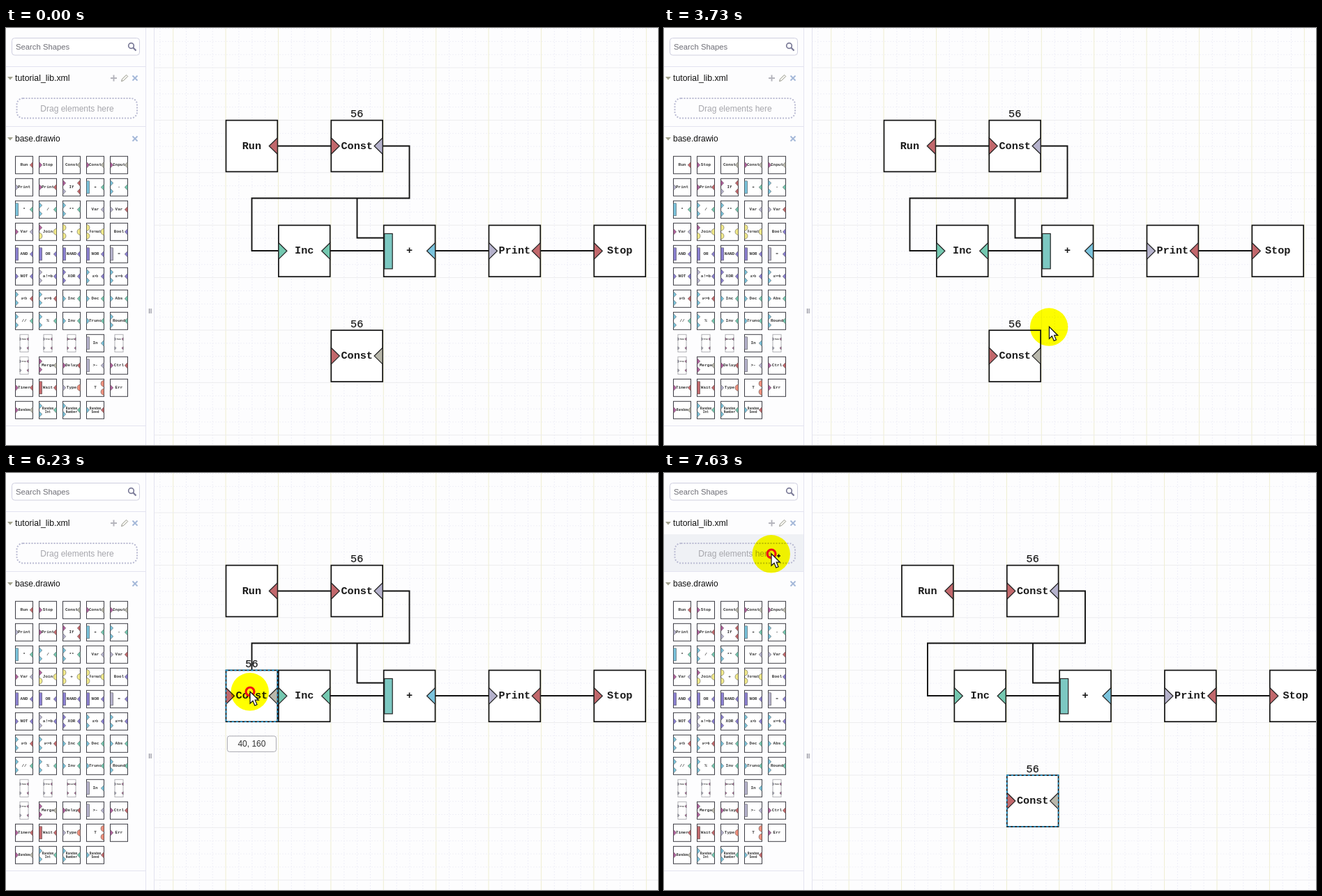
Animation, 935 px wide and 599 px high, one loop 8000 ms. Source, as an HTML page:

```html
<!DOCTYPE html>
<html lang="en">
<head>
<meta charset="utf-8">
<title>Diagram editor</title>
<style>
html, body { margin: 0; width: 100%; height: 100%; overflow: hidden; background: #fdfdfe; }
svg { display: block; }
text { font-family: "Liberation Sans", Arial, sans-serif; font-size: 12px; }
.mono { font: bold 15.2px "Liberation Mono", "Courier New", monospace; text-anchor: middle; fill: #1a1a1a; }
.caption { font-weight: normal; stroke: #1a1a1a; stroke-width: .25; }
.mid { text-anchor: middle; }
.box { fill: #fff; stroke: #111; stroke-width: 1.7; }
.port { stroke: #222; stroke-width: 1.2; }
.wire { fill: none; stroke: #111; stroke-width: 1.9; }
.icon .box { stroke: #3c3c44; stroke-width: 1; }
.icon .port { stroke: #444; stroke-width: .5; }
.icon .mono { fill: #333; }
.spot { fill: #ff0; mix-blend-mode: multiply; }
</style>
</head>
<body>
<svg id="stage" width="935" height="599" viewBox="0 0 935 599"></svg>
<script>
const LOOP = 8000, FPS = 30;
const UNIT = 1.885, STEP = UNIT * 10, SIZE = 73.8;
const ORIGIN = { x: 240.1, y: -18.2 };
const HOME = { x: 120, y: 240 };
const PRESS = { t: 4850, x: 500, y: 460 };
const SCROLL = 25.5;
const HUES = {
  r: '#c2686c', t: '#74c8b0', k: '#b9b8ac', l: '#b5b2cc', p: '#b0609c',
  b: '#7ac3dc', y: '#f1e98a', v: '#8a7fd0', o: '#ee8f7c', c: '#7cc8c2'
};

const px = u => ORIGIN.x + u * UNIT;
const py = u => ORIGIN.y + u * UNIT;
const path = (d, attrs) => `<path d="${d}" ${attrs}/>`;
const rect = (x, y, w, h, attrs) => `<rect x="${x}" y="${y}" width="${w}" height="${h}" ${attrs}/>`;
const text = (x, y, s, attrs) => `<text x="${x}" y="${y}" ${attrs}>${s}</text>`;

// Triangle with its base at x; dir 1 points right, -1 left
const port = (x, y, dir, w, h, hue) =>
  path(`M${x} ${y - h}L${x + dir * w} ${y}L${x} ${y + h}Z`, `class="port" fill="${HUES[hue]}"`);

function node(x, y, label, left, right, caption = '') {
  const m = SIZE / 2;
  let s = rect(0, 0, SIZE, SIZE, 'class="box"');
  if (left === 'c') s += rect(1, 12, 11.5, 50.5, `class="port" fill="${HUES.c}"`);
  else if (left) s += port(0, m, 1, 12, 11.8, left);
  if (right) s += port(SIZE, m, -1, 12, 11.8, right);
  s += text(m, 41, label, 'class="mono"') + text(m, -4.6, caption, 'class="mono caption"');
  return `<g transform="translate(${x} ${y})">${s}</g>`;
}

function grid() {
  let s = '';
  for (let i = -8; i < 40; i++) {
    const major = i % 4 === 0, x = px(i * 10) - .4, y = py(i * 10) - .2;
    s += path(`M${x} 0V599`, `stroke="${major ? '#efeed2' : '#efeff8'}" ${major ? '' : 'stroke-dasharray="2 2"'}`);
    if (i > 0) s += path(`M100 ${y}H935`, `stroke="${major ? '#ececee' : '#f0f0f7'}" ${major ? '' : 'stroke-dasharray="2 2"'}`);
  }
  return s;
}

function wires() {
  return path('M390 169.5H466M541 169.5H578.5V244.5H352.5V320H391M503.5 244.5V301.5H541' +
    'M465 320H541M616 320H692M767 320H843', 'class="wire"');
}

function hoverArrows() {
  const cx = px(HOME.x) + SIZE / 2, cy = py(HOME.y) + SIZE / 2;
  return [0, 90, 180, 270].map(a =>
    path('M0 -68L7 -59H3V-48H-3V-59H-7Z', `fill="#d6eef8" transform="translate(${cx} ${cy}) rotate(${a})"`)).join('');
}

// label,left ports,right ports; capitals are bars, "~" splits lines, "#" is a narrow tile
const TILES = `Run,,r Stop,p, Const,,k Const,p,k Input,p,k
Print,l, Print,p,r If,pl,rr +,B,t -,bb,t
*,B,t /,bb,t **,bb,t Var,,l Var,l,r
Var,p,l Join,py,y +,yy,y Format,yy,y Bool,,v
AND,V,v OR,V,v NAND,V,v NOR,V,v =,L,v
NOT,v,v a!=b,ll,v XOR,vv,v a&gt;b,bb,v a&gt;=b,bb,v
a&lt;b,bb,r a&lt;=b,bb,r Inc,b,t Dec,b,t Abs,b,t
//,bb,t %,bb,t Inv,b,t Trunc,b,t Round,bb,t
#Func,l,p #Proc,l,p #Return,p, In,L,b #Func,l,p
#Proc,l,p Merge,pp,k Delay,p,r >-,L,l Ctrl,p,r
Timer,p,r Wait,R,r Type,l,o T,,oo Err,p,
Random,p,k Random~Int,bb,t Random~Number,bb,t Random~Seed,b,r`;

function tilePorts(codes, x, dir) {
  return [...codes].map((ch, i) => {
    const y = codes.length > 1 ? (i ? 6 : -6) : 0, hue = ch.toLowerCase();
    if (ch !== hue) return rect(x, -9, 4.2, 18, `class="port" fill="${HUES[hue]}"`);
    if ('yo'.includes(ch))
      return path(`M${x} ${y - 4.5}A4.5 4.5 0 0 ${dir > 0 ? 1 : 0} ${x} ${y + 4.5}Z`, `class="port" fill="${HUES[ch]}"`);
    return port(x, y, dir, 4.2, 4.5, ch);
  }).join('');
}

function tile(spec, col, row) {
  const narrow = spec[0] === '#';
  const [label, left, right] = spec.replace('#', '').split(',');
  const half = narrow ? 6 : 12.5, lines = label.split('~');
  let s = rect(-half, -12.5, half * 2, 25, narrow ? 'class="box" style="stroke:#b0b0b4"' : 'class="box"');
  if (narrow) {
    s += text(0, -5, label, 'class="mono" style="font-size:2.6px"');
    for (const y of [-6, 7])
      s += port(-6, y, 1, 2, 2, left || 'l') + port(6, y, -1, 2, 2, right || 'p');
  } else {
    s += tilePorts(left, -half, 1) + tilePorts(right, half, -1);
    const size = lines.length > 1 || label.length > 5 ? 4.6 : 6;
    lines.forEach((line, i) => {
      const y = lines.length > 1 ? -.8 + i * 4.6 : 1.6;
      s += text(0, y, line, `class="mono" style="font-size:${size}px"`);
    });
  }
  return `<g class="icon" transform="translate(${26 + col * 34} ${196.8 + row * 32})">${s}</g>`;
}

function sidebar() {
  const cross = y => path(`M181.5 ${y - 3.5}l7 7m0 -7l-7 7`, 'stroke="#a3b7d8" stroke-width="1.8"');
  const fold = y => path(`M2 ${y - 2}h8l-4 4.5z`, 'fill="#a0a08c"');
  let s = rect(0, 0, 212, 599, 'fill="#fdfdfe"');
  s += path('M200.5 0V599M212.5 0V599M0 55.5H200M0 141.5H200M0 571.5H200', 'stroke="#e3e3f0"');
  s += path('M205.5 403V410M208 403V410', 'stroke="#8c8c98" stroke-width="1.2"');
  s += rect(8.5, 14.5, 183, 24.5, 'rx="4" fill="#fff" stroke="#cfcfe0"');
  s += text(14, 31, 'Search Shapes', 'fill="#707078" style="font-size:11.3px"');
  s += '<circle cx="179.5" cy="25.5" r="3.8" fill="none" stroke="#7b7b98" stroke-width="1.7"/>';
  s += path('M182.3 28.3L186.5 32.5', 'stroke="#7b7b98" stroke-width="2.2"');
  s += fold(72) + text(13, 76, 'tutorial_lib.xml', 'fill="#111" style="font-size:12.3px"');
  s += path('M150 72H159M154.5 67.5V76.5', 'stroke="#b5b5bd" stroke-width="2"');
  s += path('M165.5 76.5l1 -3.2l6 -6l2.2 2.2l-6 6z', 'fill="#f4f4ee" stroke="#99998f"') + cross(72);
  s += rect(0, 88, 200, 53, 'id="zone" fill="#eff1f5"');
  s += rect(15.5, 101, 172.5, 28.5, 'rx="9" fill="none" stroke="#b9bad2" stroke-width="2" stroke-dasharray="2 2"');
  s += text(102, 119.5, 'Drag elements here', 'class="mid" fill="#a6a6ac"');
  s += fold(159) + text(13, 163, 'base.drawio', 'fill="#111"') + cross(159);
  TILES.split('\n').forEach((line, row) =>
    line.split(' ').forEach((spec, col) => { s += tile(spec, col, row); }));
  return s;
}

function pointer() {
  const cross = 'M0 -10L4 -6H1.2V-1.2H6V-4L10 0L6 4V1.2H1.2V6H4L0 10L-4 6H-1.2V1.2H-6V4L-10 0L-6 -4V-1.2H-1.2V-6H-4Z';
  return '<circle class="spot" cx="-.3" cy=".3" r="27.2"/>' +
    '<circle id="ring" r="6" fill="none" stroke="#f01414" stroke-width="3.2"/>' +
    path('M0 0V17L4 13.2L6.8 20L10 18.7L7.2 12.2H12.3Z', 'id="arrow" fill="#fff" stroke="#111" stroke-width="1.2"') +
    path(cross, 'id="move" fill="#111" stroke="#fff" stroke-width="1.6" paint-order="stroke"') +
    path('M8 3H13M10.5 .5V5.5', 'id="plus" stroke="#111" stroke-width="1.5"');
}

const nodes = [
  [40, 80, 'Run', '', 'r'], [120, 80, 'Const', 'r', 'l', '56'],
  [80, 160, 'Inc', 't', 't'], [160, 160, '+', 'c', 'b'],
  [240, 160, 'Print', 'l', 'r'], [320, 160, 'Stop', 'r', '']
].map(([x, y, ...rest]) => node(px(x), py(y), ...rest)).join('');

// The spot blends with the drawing, so the pointer parts sit directly on the stage
const stage = document.getElementById('stage');
stage.innerHTML =
  `<g id="page">${grid()}${wires()}${nodes}<g id="hover">${hoverArrows()}</g>` +
  `<g id="drag">${node(0, 0, 'Const', 'r', 'k', '56')}` +
  rect(0, 0, SIZE, SIZE, 'id="outline" fill="none" stroke="#1e9bd8" stroke-width="1.6" stroke-dasharray="3 3"') +
  `<g id="tip">${rect(0, 94.5, 70, 22.5, 'id="tipBox" rx="3" fill="#fdfdfd" stroke="#a9a9b0"')}` +
  `${text(SIZE / 2, 110, '', 'id="tipText" class="mid" fill="#333"')}</g></g></g>` +
  `<g>${sidebar()}</g>${pointer()}`;

const $ = id => document.getElementById(id);
const parts = [stage.querySelector('.spot'), $('ring'), $('arrow'), $('move'), $('plus')];
const [spot, ring, arrow, move, plus] = parts;

// Pointer route: time, x, y
const ROUTE = [
  [2070, 926.5, 422.7], [2230, 845, 404], [2450, 745, 391.5], [2730, 664, 406],
  [2810, 645, 404], [2870, 647, 405], [2930, 666, 408], [3270, 666, 408],
  [3700, 560, 428], [4100, 468, 445], [4230, 514, 469], [4330, 504.5, 465],
  [4670, 504.5, 465], [4850, 500, 460], [5370, 464, 437], [5670, 464, 437],
  [5870, 445, 417], [6230, 350, 314], [6600, 248.5, 204], [6900, 206, 158],
  [7330, 168, 123], [7400, 168, 123], [7530, 148.5, 112], [7630, 154, 116], [8000, 154, 116]
];

// Smooth curve through the route without overshoot
function along(t, k) {
  let i = 0;
  while (i < ROUTE.length - 2 && t >= ROUTE[i + 1][0]) i++;
  const slope = j => ROUTE[j + 1]
    ? (ROUTE[j + 1][k] - ROUTE[j][k]) / (ROUTE[j + 1][0] - ROUTE[j][0]) : 0;
  const tangent = j => {
    if (!j) return slope(0);
    const a = slope(j - 1), b = slope(j);
    return a * b > 0 ? 2 * a * b / (a + b) : 0;
  };
  const p = ROUTE[i], q = ROUTE[i + 1], h = q[0] - p[0], u = (t - p[0]) / h, v = 1 - u;
  return v * v * (1 + 2 * u) * p[k] + u * u * (3 - 2 * u) * q[k] +
    h * u * v * (v * tangent(i) - u * tangent(i + 1));
}

const show = (el, on) => el.setAttribute('visibility', on ? 'visible' : 'hidden');

function draw(t) {
  const live = t >= ROUTE[0][0], x = live ? along(t, 1) : 0, y = live ? along(t, 2) : 0;
  const pressed = t >= PRESS.t, outside = pressed && x < 212;
  let nx = 0, ny = 0;
  if (pressed && !outside) {
    nx = Math.round((x - PRESS.x) / STEP);
    ny = Math.round((y - PRESS.y) / STEP);
  }
  const moved = nx !== 0 || ny !== 0;
  const hover = t >= 4080 && !pressed;

  $('page').setAttribute('transform', `translate(${outside ? SCROLL : 0} 0)`);
  $('drag').setAttribute('transform', `translate(${px(HOME.x) + nx * STEP} ${py(HOME.y) + ny * STEP})`);
  show($('hover'), hover);
  show($('outline'), pressed);
  show($('tip'), moved);
  if (moved) {
    const label = $('tipText');
    label.textContent = `${HOME.x + nx * 10}, ${HOME.y + ny * 10}`;
    const w = label.getComputedTextLength() + 30;
    $('tipBox').setAttribute('width', w);
    $('tipBox').setAttribute('x', (SIZE - w) / 2);
  }
  show($('zone'), outside && x < 200 && y > 88 && y < 141);

  for (const el of parts) el.setAttribute('transform', `translate(${x} ${y})`);
  show(spot, live);
  show(ring, pressed);
  show(arrow, live && !hover);
  show(move, hover);
  show(plus, outside);
}

function cadence(t) {
  const start = k => Math.round(k * 100 / FPS) * 10;
  const k = Math.floor(t * FPS / 1000);
  return start(k + 1) <= t ? start(k + 1) : Math.min(start(k), t);
}

const begin = performance.now();
function tick() {
  draw(cadence((performance.now() - begin) % LOOP));
  requestAnimationFrame(tick);
}
tick();
</script>
</body>
</html>
```
